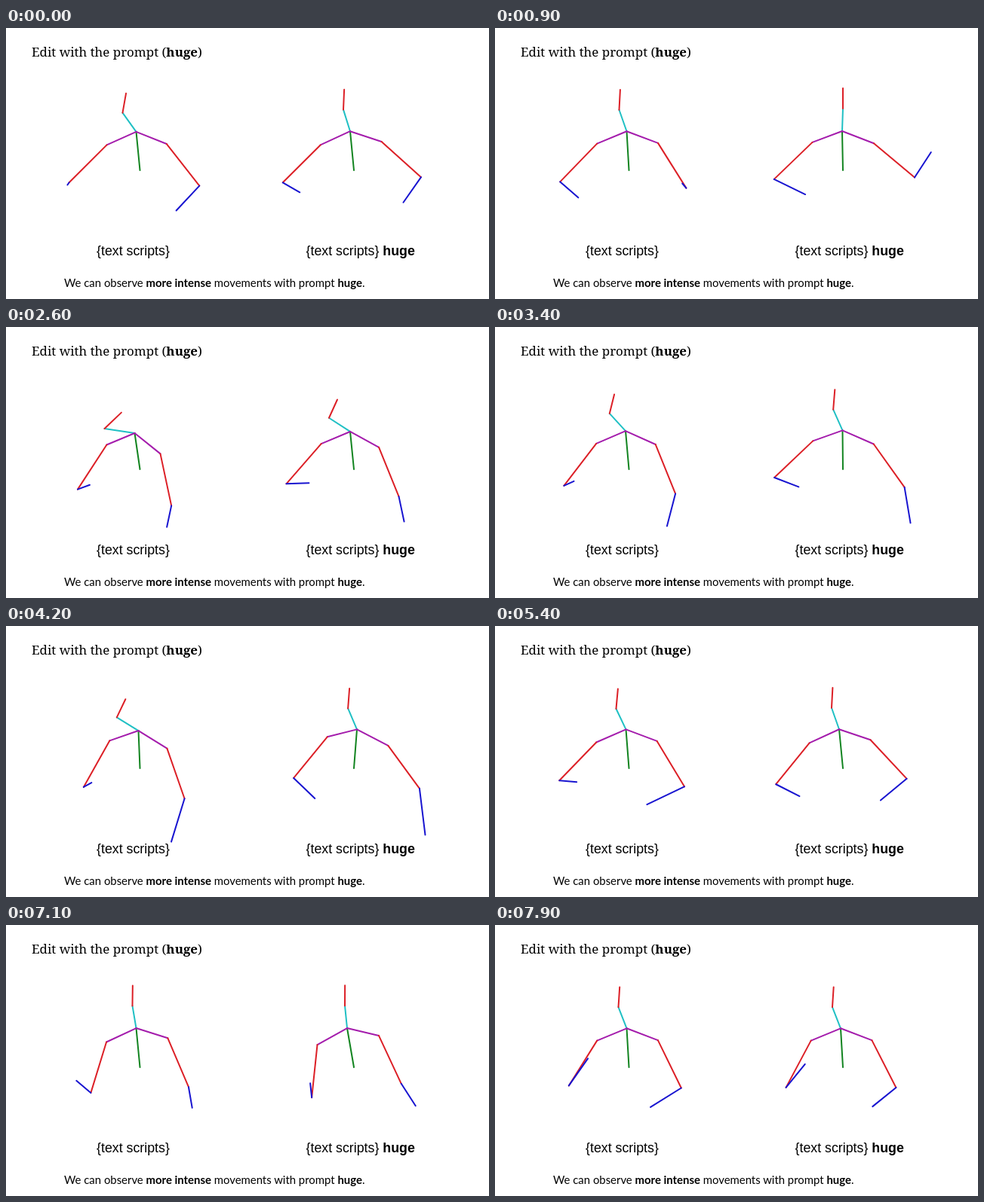
Write an HTML page with a canvas that moves like this. It is 640 px wide and 360 px high and loops after 8000 ms.

```html
<!DOCTYPE html>
<html lang="en">
<head>
<meta charset="utf-8">
<title>Edit with the prompt</title>
<style>
  html, body { margin: 0; width: 100%; height: 100%; overflow: hidden; background: #fff; }
  svg, canvas { position: absolute; left: 0; top: 0; width: 640px; height: 360px; }
  .title { font: 16.9px "Noto Serif", serif; }
  .label { font: 17.8px "Liberation Sans", Arial, sans-serif; }
  .note { font: 14.9px Lato, sans-serif; }
  .bold { font-weight: 700; }
</style>
</head>
<body>
<canvas id="stage" width="640" height="360"></canvas>
<svg viewBox="0 0 640 360" fill="#000">
  <text class="title" x="34" y="38">Edit with the prompt (<tspan class="bold">huge</tspan>)</text>
  <text class="label" x="120" y="302">{text scripts}</text>
  <text class="label" x="397.5" y="302">{text scripts} <tspan class="bold">huge</tspan></text>
  <text class="note" x="77" y="344">We can observe <tspan class="bold">more intense</tspan> movements with prompt <tspan class="bold">huge</tspan>.</text>
</svg>
<script>
const ctx = document.getElementById('stage').getContext('2d');
const LOOP = 8, FPS = 10, UPPER_ARM = 70.5;
const RED = '#dc2027', CYAN = '#20c0c4', PURPLE = '#a41cac', GREEN = '#128420', BLUE = '#1814d0';

// Gesture times in seconds; every track below has one value per gesture.
// Arm angles are degrees away from straight down, positive outward.
const TIMES = [0, 0.9, 2.6, 4.2, 5.4, 7.1, 7.9];

const figures = [
  {
    root: [177.5, 189],
    nod: [18, 10, 40, 29, 13, 5, 11],
    sway: [-5, -3, -7, -2, -4, -5, -3],
    arms: [
      { side: -1, upper: [45, 44, 33, 29, 44, 17, 32], fore: [34, -49, -110, -119, -85, 130, 215], reach: [4, 32, 17, 12, 23, 25, 44] },
      { side: 1, upper: [38, 32, 12, 19, 31, 23, 26], fore: [-43, -140, -12, -17, -65, 8, -58], reach: [45, 8, 29, 60, 55, 28, 48] }
    ]
  },
  {
    root: [461, 189],
    nod: [9, -1, 28, 12, 10, 3, 11],
    sway: [-5, -1, -5, 4, -5, -9, -3],
    arms: [
      { side: -1, upper: [45, 46, 41, 39, 39, 6, 28], fore: [-60, -64, -92, -46, -63, -186, -141], reach: [26, 46, 30, 39, 35, 19, 40] },
      { side: 1, upper: [48, 50, 22, 36, 43, 25, 27], fore: [-35, 147, 12, 7, -51, 31, -51], reach: [41, 40, 34, 62, 45, 35, 40] }
    ]
  }
];

const pulse = (t, at, width) => Math.exp(-(((t - at) / width) ** 2));

function sample(track, t) {
  let i = 0;
  while (i < TIMES.length - 2 && t >= TIMES[i + 1]) i++;
  const k = (t - TIMES[i]) / (TIMES[i + 1] - TIMES[i]);
  return track[i] + (track[i + 1] - track[i]) * k * k * (3 - 2 * k);
}

// Draws a bone and returns its far end
function bone([x, y], dx, dy, color) {
  ctx.strokeStyle = color;
  ctx.beginPath();
  ctx.moveTo(x, y);
  ctx.lineTo(x + dx, y + dy);
  ctx.stroke();
  return [x + dx, y + dy];
}

function limb(from, side, degrees, length, color) {
  const a = degrees * Math.PI / 180;
  return bone(from, side * length * Math.sin(a), length * Math.cos(a), color);
}

function drawFigure({ root, nod, sway, arms }, t) {
  const rise = pulse(t, 3.6, 0.3);   // straightens up between the two bows
  const flare = pulse(t, 6.3, 0.4);  // outward sweep of the right-hand forearm
  const n = sample(nod, t) * (1 - 0.6 * rise);
  const s = sample(sway, t);
  const bow = n * n / 100;

  const chest = bone(root, s, 0.25 * bow - 52, GREEN);
  const neck = bone(chest, -n, 1.5 * bow - 30, CYAN);
  bone(neck, 1.4 * bow, 0.35 * bow - 27, RED);

  for (const { side, upper, fore, reach } of arms) {
    const shoulder = side < 0
      ? bone(chest, 0.15 * bow - 39.5, 14 - 0.9 * s - 0.3 * bow, PURPLE)
      : bone(chest, 42 - 0.5 * bow, 17 + 0.8 * s + bow, PURPLE);
    const elbow = limb(shoulder, side, sample(upper, t) + 10 * rise, UPPER_ARM, RED);
    const sweep = side > 0 ? 100 * flare : 0;
    limb(elbow, side, sample(fore, t) + sweep, sample(reach, t), BLUE);
  }
}

function draw(seconds) {
  const t = Math.floor((seconds % LOOP) * FPS + 1e-6) / FPS;
  ctx.clearRect(0, 0, 640, 360);
  ctx.lineWidth = 2;
  ctx.lineCap = 'round';
  for (const f of figures) drawFigure(f, t);
}

const begin = performance.now();
function tick() {
  draw((performance.now() - begin) / 1000);
  requestAnimationFrame(tick);
}
tick();
</script>
</body>
</html>
```
